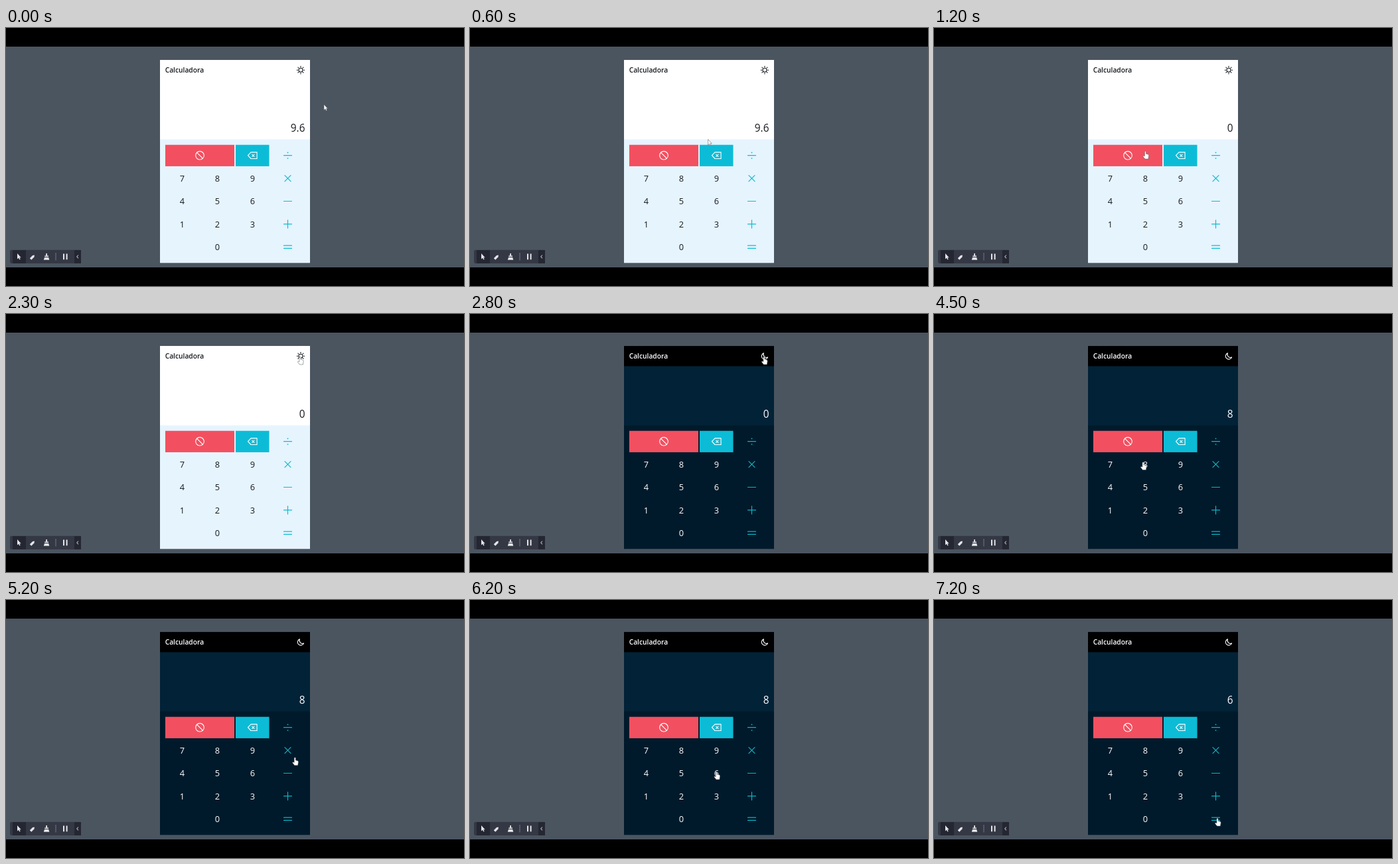
Animation, 690 px wide and 388 px high, one loop 8000 ms. Source, as an HTML page:

```html
<!DOCTYPE html>
<html lang="es">
<head>
<meta charset="utf-8">
<title>Calculadora</title>
<style>
html, body { margin: 0; width: 100%; height: 100%; overflow: hidden; background: #000; }
svg {
  --head: #fff; --screen: #fff; --pad: #e6f4fe; --ink: #16191f; --op: #0cbcd0;
  display: block; width: 690px; height: 388px;
  font-family: "Open Sans", "Noto Sans", sans-serif;
}
svg.dark { --head: #000; --screen: #022237; --pad: #001a2b; --ink: #fff; --op: #0cb3c4; }
.ink { fill: var(--ink); }
.line { fill: none; stroke: #fff; stroke-width: 1.1; stroke-linecap: round; stroke-linejoin: round; }
.theme { stroke: var(--ink); }
.op { stroke: var(--op); stroke-width: 1.2; }
.light { fill: #e4e5e9; }
#moon, .dark #sun { display: none; }
.dark #moon { display: inline; }
#cursor { fill: #fff; stroke: #4a4e55; stroke-width: .5; stroke-linejoin: round; }
</style>
</head>
<body>
<svg id="stage" viewBox="0 0 690 388">
  <defs><path id="pointer" d="M0 0V8.5L2 6.7 3.3 9.4 4.6 8.8 3.4 6.2H5.7Z"/></defs>
  <rect y="28" width="690" height="332" fill="#4b5560"/>

  <rect x="232" y="48.3" width="226" height="305" fill="var(--pad)"/>
  <rect x="232" y="48.3" width="226" height="119.2" fill="var(--screen)"/>
  <rect x="232" y="48.3" width="226" height="30.2" fill="var(--head)"/>
  <text class="ink" x="239.7" y="67" font-size="10.24" font-weight="600">Calculadora</text>
  <text class="ink" id="value" x="450.5" y="156" font-size="15.4" text-anchor="end"></text>
  <g id="sun" class="line theme" transform="translate(444 63.2)"><circle r="3"/></g>
  <path id="moon" class="line theme" d="M448.6 65A4.7 4.7 0 0 1 442.4 58.8A4.8 4.8 0 1 0 448.6 65Z"/>

  <rect x="240" y="175.7" width="104" height="32.2" fill="#f25060"/>
  <rect x="346" y="175.7" width="50.5" height="32.2" fill="#0cbcd6"/>
  <g class="line" transform="translate(292 191.7)"><circle r="6.3"/><path d="M-4.4-4.4 4.4 4.4"/></g>
  <path class="line" transform="translate(371.5 191.7)" d="M-7 0-2.5-4.8H6.6V4.8H-2.5ZM-.7-1.6l3.2 3.2m0-3.2l-3.2 3.2"/>
  <g id="keys" class="ink" font-size="12.8" text-anchor="middle"></g>

  <rect x="6" y="333.7" width="107" height="20.3" rx="2.5" fill="#343844"/>
  <path d="M10 334h20v20H10zM103 334h10v20h-10z" fill="#242732"/>
  <g class="light">
    <use href="#pointer" x="17" y="339"/>
    <path d="M0-1.7H6L8.5 0 6 1.7H0Z" transform="translate(37 347.5) rotate(-45)"/>
    <path d="M60.2 339h1.8v3.4h2v1.7h-5.8v-1.7h2zM58 344.9h6.2l1.1 3.8h-8.5z"/>
    <path d="M86 339.5h2v8.8h-2zM90.6 339.5h2v8.8h-2z"/>
  </g>
  <path d="M75 338v11.5" stroke="#737782"/>
  <path class="line" d="M108.7 341.8l-2 2.1 2 2.1" style="stroke: #a9acb4"/>

  <g id="cursor">
    <use id="arrow" href="#pointer"/>
    <path id="hand" d="M-1.1 .9Q0-.6 1.1 .9V4.2L4 5Q5.4 5.5 5.2 7L4.4 12H-.6L-3.7 8.1Q-3.3 6.4-1.1 7.6Z"/>
  </g>
</svg>
<script>
const LOOP = 8000, STEP = 100;
const $ = id => document.getElementById(id);
const col = i => 265.5 + 53 * i, row = i => 191.7 + 34.4 * i;

// Each move runs to a point, optionally bent toward a control point
const moves = [
  { at: 0, time: 800, to: [col(1), row(0) - 6.7] },
  { at: 1500, time: 300, to: [449, 48] },
  { at: 1900, time: 400, to: [443, 64] },
  { at: 3000, time: 1100, to: [col(1) - 3.5, row(1) - 3.6], bend: [628, 130] },
  { at: 4600, time: 800, to: [col(3) + 3, row(1)], bend: [467, 255] },
  { at: 5700, time: 500, to: [col(2), row(2) - 2.5] },
  { at: 6700, time: 500, to: [col(3) + 2.5, row(4) - 1.3] }
];

function cursorAt(t) {
  let pos = [479, 115];
  for (const { at, time, to, bend } of moves) {
    if (t < at) break;
    const k = Math.min((t - at) / time, 1);
    const mix = (a, b) => a + (b - a) * k;
    pos = pos.map((p, i) => bend
      ? mix(mix(p, bend[i]), mix(bend[i], to[i]))
      : mix(p, to[i]));
  }
  return pos;
}

function overButton(x, y) {
  const key = x > 240 && x < 451 && y > 176 && y < 346;
  const toggle = x > 436 && x < 452 && y < 74;
  return key || toggle;
}

function draw(now) {
  const t = Math.floor(now % LOOP / STEP) * STEP;
  const [x, y] = cursorAt(t), hand = overButton(x, y);
  $("stage").classList.toggle("dark", t >= 2800);
  $("value").textContent = t < 1200 ? "9.6" : t < 4500 ? "0" : t < 6400 ? "8" : "6";
  $("cursor").setAttribute("transform", `translate(${x} ${y})`);
  $("hand").style.display = hand ? "" : "none";
  $("arrow").style.display = hand ? "none" : "";
}

const add = (id, markup) => $(id).insertAdjacentHTML("beforeend", markup);
[..."789456123 0"].forEach((digit, i) =>
  add("keys", `<text x="${col(i % 3)}" y="${row(1 + Math.floor(i / 3)) + 4.7}">${digit}</text>`));

const bar = "M-6 0H6";
[bar + "M-.3-4.5h.6v.4h-.6zM-.3 4.1h.6v.4h-.6z", "M-4.5-4.5 4.5 4.5M4.5-4.5-4.5 4.5",
  bar, bar + "M0-6V6", "M-6-2.1H6M-6 2.1H6"].forEach((d, i) =>
  add("keys", `<path class="line op" d="${d}" transform="translate(${col(3)} ${row(i)})"/>`));

for (let a = 0; a < 360; a += 45)
  add("sun", `<path d="M4.5 0H5.7" transform="rotate(${a})"/>`);

const start = performance.now();
(function frame() {
  draw(performance.now() - start);
  requestAnimationFrame(frame);
})();
</script>
</body>
</html>
```
